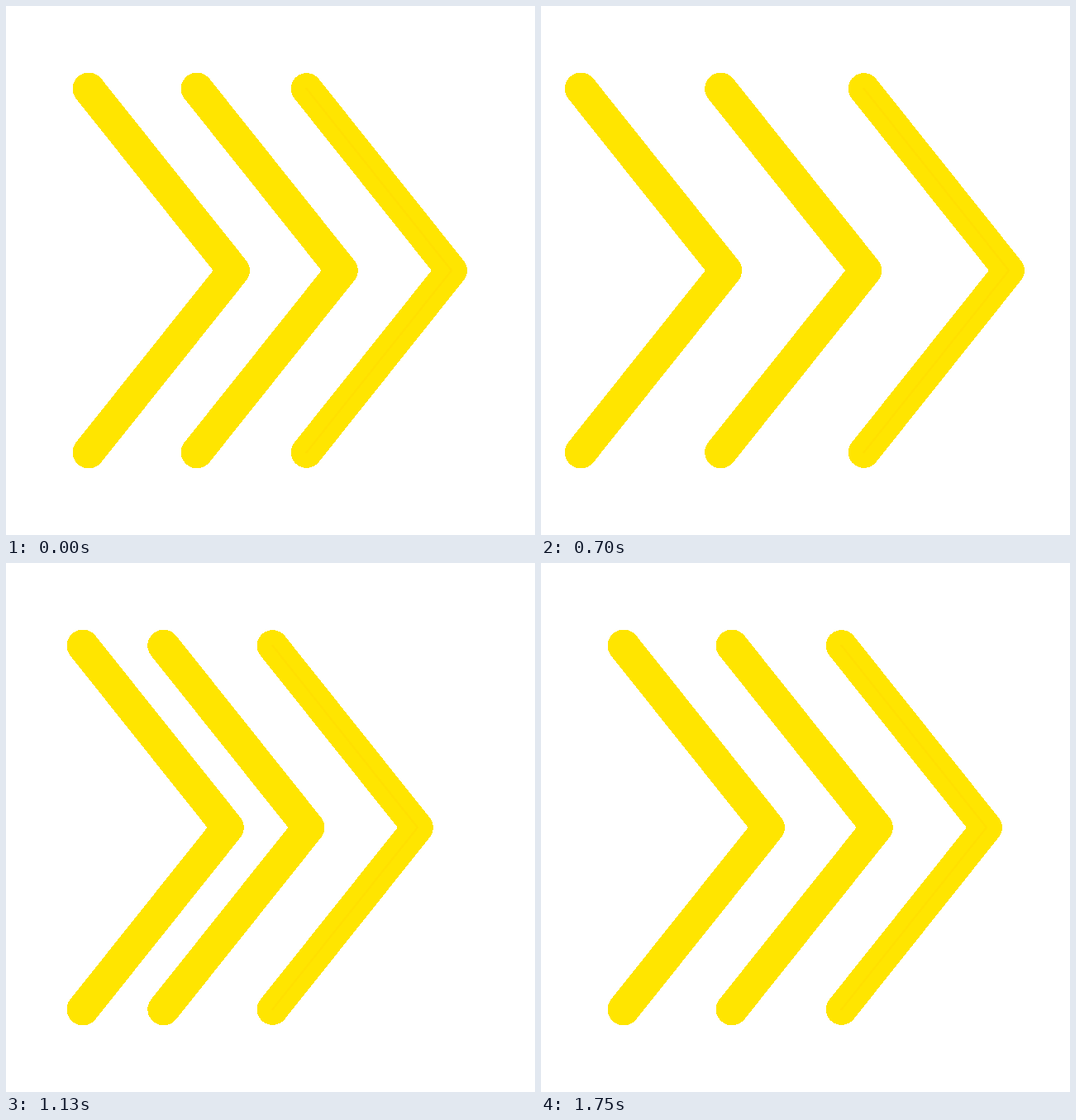
An HTML page for the animation above (1980 ms loop, 640x640 px).

```html
<!DOCTYPE html>
<html lang="en">
<head>
<meta charset="utf-8">
<title>Chevrons</title>
<style>
  html, body { margin: 0; width: 100%; height: 100%; overflow: hidden; background: #fff; }
  svg { display: block; width: 640px; height: 640px; }
  path {
    fill: none;
    stroke-linecap: round;
    stroke-linejoin: round;
    shape-rendering: crispEdges;
  }
</style>
</head>
<body>
<svg id="stage" viewBox="0 0 640 640"></svg>
<script>
const NS = 'http://www.w3.org/2000/svg';
const LOOP = 1980;
const KEYS = [[0, 0], [15, -81.5], [26, 75], [34, -46], [42, 59], [49, 0]];
const stage = document.getElementById('stage');

function add(parent, name, attrs = {}) {
  const el = document.createElementNS(NS, name);
  for (const key in attrs) el.setAttribute(key, attrs[key]);
  return parent.appendChild(el);
}

function chevron(x, width, lag, seam) {
  const el = add(stage, 'g');
  const d = 'M0 100L175.4 320L0 540';
  add(el, 'path', { d, stroke: '#ffe500', 'stroke-width': width });
  if (seam) add(el, 'path', { d, stroke: '#ffe000', 'stroke-width': 2.5 });
  return { el, x, lag };
}

// The right chevron leads; the others follow two steps apart
const chevrons = [
  chevron(100, 38.9, 4),
  chevron(231, 38.7, 2),
  chevron(363.6, 37.8, 0, true)
];

// Step number at a time: 30 ms steps, with one 70 ms step in every 490 ms
function stepAt(ms) {
  const block = Math.floor(ms / 490);
  const u = ms - block * 490;
  const k = Math.max(Math.min(Math.floor(u / 30), 7), Math.floor((u - 40) / 30));
  return block * 15 + k;
}

// Same as cubic-bezier(0.31, 0, 0.69, 1)
function ease(x) {
  let u = x;
  for (let i = 0; i < 6; i++) u = x + 0.07 * u * (1 - u) * (1 - 2 * u);
  return u * u * (3 - 2 * u);
}

function shift(step) {
  if (step <= 0) return 0;
  for (let i = 1; i < KEYS.length; i++) {
    const [s0, v0] = KEYS[i - 1];
    const [s1, v1] = KEYS[i];
    if (step <= s1) return v0 + (v1 - v0) * ease((step - s0) / (s1 - s0));
  }
  return 0;
}

function draw(ms) {
  const step = stepAt(ms);
  for (const c of chevrons) {
    c.el.setAttribute('transform', `translate(${c.x + shift(step - c.lag)} 0)`);
  }
}

const start = performance.now();
function tick() {
  draw((performance.now() - start) % LOOP);
  requestAnimationFrame(tick);
}
tick();
</script>
</body>
</html>
```
